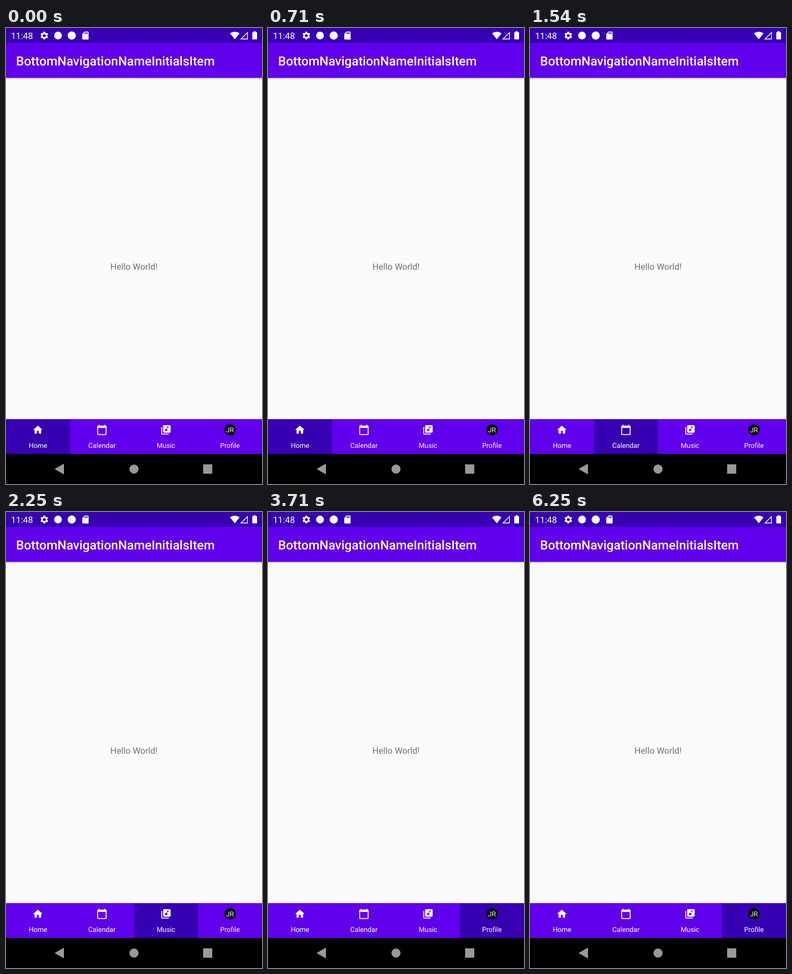
An HTML page for the animation above (6.33 s loop, 561x998 px).

```html
<!DOCTYPE html>
<html lang="en">
<head>
<meta charset="utf-8">
<title>Bottom navigation</title>
<style>
  html, body { margin: 0; width: 100%; height: 100%; overflow: hidden; background: #000; }
  svg { display: block; width: 561px; height: 998px; font-family: Roboto, sans-serif; text-rendering: geometricPrecision; }
  .label { font-size: 15.1px; text-anchor: middle; fill: #fff; }
</style>
</head>
<body>
<svg viewBox="0 0 561 998">
  <defs>
    <linearGradient id="shade" x2="0" y2="1">
      <stop stop-color="#000" stop-opacity=".15"/>
      <stop offset="1" stop-color="#000" stop-opacity="0"/>
    </linearGradient>
  </defs>

  <rect width="561" height="998" fill="#fafafa"/>
  <rect y="109" width="561" height="5" fill="url(#shade)"/>
  <rect width="561" height="33" fill="#3700b3"/>
  <rect y="32.6" width="561" height="76.6" fill="#6000ec"/>

  <!-- status bar -->
  <g fill="#fff">
    <text x="11" y="24" font-size="19.3">11:48</text>
    <path transform="translate(73.4 6) scale(.88)" fill-rule="evenodd" d="M19.14 12.94c.04-.3.06-.61.06-.94s-.02-.64-.07-.94l2.03-1.58c.18-.14.23-.41.12-.61l-1.92-3.32c-.12-.22-.37-.29-.59-.22l-2.39.96c-.5-.38-1.03-.7-1.62-.94l-.36-2.54A.48.48 0 0 0 13.92 2.4h-3.84c-.24 0-.43.17-.47.41l-.36 2.54c-.59.24-1.13.57-1.62.94l-2.39-.96c-.22-.08-.47 0-.59.22L2.74 8.87c-.12.21-.08.47.12.61l2.03 1.58c-.05.3-.09.63-.09.94s.02.64.07.94l-2.03 1.58c-.18.14-.23.41-.12.61l1.92 3.32c.12.22.37.29.59.22l2.39-.96c.5.38 1.03.7 1.62.94l.36 2.54c.05.24.24.41.48.41h3.84c.24 0 .44-.17.47-.41l.36-2.54c.59-.24 1.13-.56 1.62-.94l2.39.96c.22.08.47 0 .59-.22l1.92-3.32c.12-.22.07-.47-.12-.61zM12 15.6a3.6 3.6 0 1 1 0-7.2 3.6 3.6 0 0 1 0 7.2z"/>
    <circle cx="114" cy="16.5" r="8.5"/>
    <circle cx="144" cy="16.5" r="9"/>
    <path transform="translate(163.6 6.1) scale(.87)" d="M18 2h-8L4 8v12c0 1.1.9 2 2 2h12c1.1 0 2-.9 2-2V4c0-1.1-.9-2-2-2zm-6 6h-2V4h2v4zm3 0h-2V4h2v4zm3 0h-2V4h2v4z"/>
    <path transform="translate(490.6 5.5) scale(.9)" d="M12 21.5 23.6 7c-.4-.3-4.9-4-11.600-4S.8 6.700.4 7z"/>
    <path transform="translate(511.3 6.300) scale(.85)" d="M20 6.830V20H6.830zM22 2 2 22h20z" fill-rule="evenodd"/>
    <path d="M541 9h1.7V7h4.4v2h1.7q1.3 0 1.3 1.3v13.4q0 1.3-1.3 1.3H541q-1.3 0-1.3-1.3V10.3Q539.7 9 541 9z"/>
  </g>

  <text x="22" y="81.5" font-size="27.58" font-weight="500" fill="#fff">BottomNavigationNameInitialsItem</text>
  <text x="280.5" y="528.5" font-size="19.2" text-anchor="middle" fill="#737373">Hello World!</text>

  <!-- tabs -->
  <rect y="856" width="561" height="77" fill="#6000ec"/>
  <rect id="active" y="856" width="140.25" height="77" fill="#3700b3"/>
  <g fill="#fff">
    <path transform="translate(57.4 867.1) scale(1.03)" d="M10 20v-6h4v6h5v-8h3L12 3 2 12h3v8z"/>
    <path transform="translate(197.8 867.1) scale(1.03)" d="M20 3h-1V1h-2v2H7V1H5v2H4c-1.1 0-2 .9-2 2v16c0 1.1.9 2 2 2h16c1.1 0 2-.9 2-2V5c0-1.1-.9-2-2-2zm0 18H4V8h16v13z"/>
    <path transform="translate(338.1 867.1) scale(1.03)" d="M20 2H8c-1.1 0-2 .9-2 2v12c0 1.1.9 2 2 2h12c1.1 0 2-.9 2-2V4c0-1.1-.9-2-2-2zm-2 5h-3v5.5c0 1.38-1.12 2.5-2.5 2.5S10 13.88 10 12.5s1.12-2.5 2.5-2.5c.57 0 1.08.19 1.5.51V5h4v2zM4 6H2v14c0 1.1.9 2 2 2h14v-2H4V6z"/>
  </g>
  <circle cx="490.7" cy="879.5" r="12.4"/>
  <text x="490.7" y="885" font-size="15" text-anchor="middle" fill="#fff">JR</text>
  <text class="label" x="70.2" y="919">Home</text>
  <text class="label" x="210.2" y="919">Calendar</text>
  <text class="label" x="350.6" y="919">Music</text>
  <text class="label" x="490.7" y="919">Profile</text>

  <!-- system buttons -->
  <rect y="932.4" width="561" height="66"/>
  <g fill="#999" stroke="#999" stroke-linejoin="round">
    <path d="M107.3 965.2 126.5 954.2V976.2z"/>
    <circle cx="280.5" cy="965.3" r="9.5"/>
    <rect x="432.5" y="955.5" width="19" height="19.5"/>
  </g>
</svg>
<script>
  const LOOP = 6330, TAB = 140.25;
  // [start in ms, selected tab]
  const taps = [[0, 0], [1130, 1], [1900, 2], [2980, 3], [4440, 2], [5380, 3]];
  const active = document.getElementById('active');

  function draw() {
    const t = performance.now() % LOOP;
    const tab = taps.findLast(([start]) => start <= t)[1];
    active.setAttribute('x', tab * TAB);
    requestAnimationFrame(draw);
  }
  draw();
</script>
</body>
</html>
```
